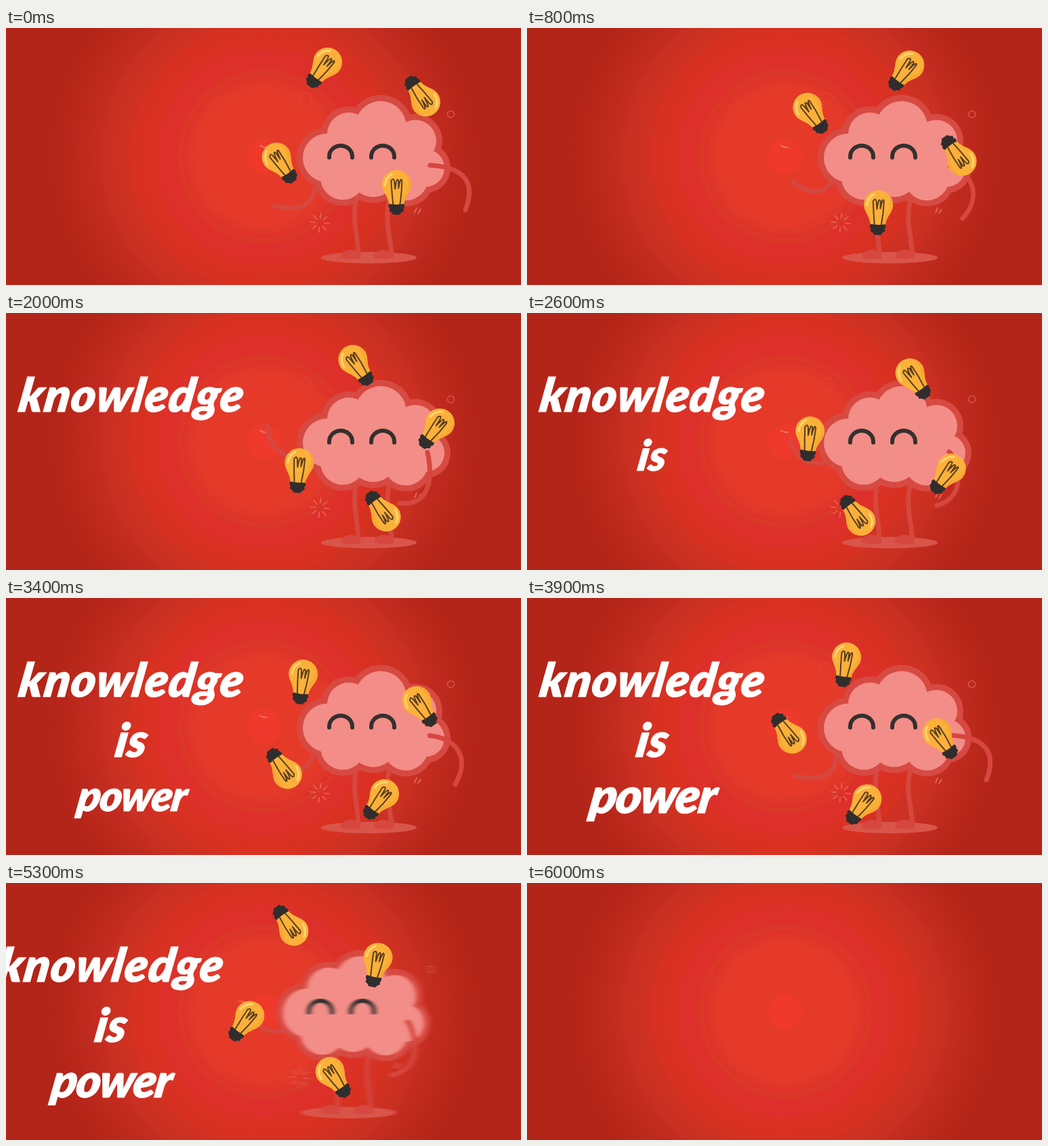
These frames come from a looping animation (760 by 380 pixels, 6.1 s). An HTML page:

```html
<!DOCTYPE html>
<html lang="en">
<head>
<meta charset="utf-8">
<title>Knowledge is power</title>
<style>
  html, body { margin: 0; width: 100%; height: 100%; overflow: hidden; background: #b32518; }
  svg { display: block; width: 100%; height: 100%; }
  text {
    font: italic 900 69px Lato, "Open Sans", sans-serif;
    fill: #fff; stroke: #fff; stroke-width: 1; stroke-linejoin: round;
    text-anchor: middle;
  }
</style>
</head>
<body>
<svg viewBox="0 0 760 380" xmlns="http://www.w3.org/2000/svg">
  <defs>
    <radialGradient id="glow" gradientUnits="userSpaceOnUse" cx="381" cy="190" r="400">
      <stop offset="0" stop-color="#ef392c"/>
      <stop offset=".058" stop-color="#ee392b"/>
      <stop offset=".068" stop-color="#e63a29"/>
      <stop offset=".25" stop-color="#e53929"/>
      <stop offset=".275" stop-color="#de3829"/>
      <stop offset=".288" stop-color="#e03529"/>
      <stop offset=".295" stop-color="#de312a"/>
      <stop offset=".303" stop-color="#db3828"/>
      <stop offset=".316" stop-color="#db3728"/>
      <stop offset=".325" stop-color="#de302a"/>
      <stop offset=".385" stop-color="#de302a"/>
      <stop offset=".415" stop-color="#d93122"/>
      <stop offset=".485" stop-color="#d73121"/>
      <stop offset=".51" stop-color="#cf3122"/>
      <stop offset=".59" stop-color="#c93022"/>
      <stop offset=".61" stop-color="#c42c20"/>
      <stop offset=".68" stop-color="#bd291d"/>
      <stop offset=".75" stop-color="#b62619"/>
      <stop offset=".8" stop-color="#b32518"/>
    </radialGradient>
    <filter id="smear" filterUnits="userSpaceOnUse" x="300" y="60" width="460" height="320" color-interpolation-filters="sRGB">
      <feGaussianBlur id="blur" stdDeviation="0 0"/>
    </filter>
    <g id="bulb">
      <path d="M0-33A21.5 21.5 0 0 1 21.5-11.5C21.5-1 12 5 11 18H-11C-12 5-21.5-1-21.5-11.5A21.5 21.5 0 0 1 0-33Z" fill="#fbb139"/>
      <path d="M13-28A21.5 21.5 0 0 1 21.5-11.5C21.5-1 12 5 11 18H6C7 4 16-1 17-12Q17.500-22 13-28Z" fill="#f7a834"/>
      <path d="M-17-10Q-16-22-7-27" fill="none" stroke="#ffd478" stroke-width="3" stroke-linecap="round"/>
      <path d="M-5 18Q-7 0-8-17Q-4-23-3-15L-2-5Q0-24 3-17L3-6Q6-24 8-17Q8 0 5 18" fill="none" stroke="#5a3d20" stroke-width="2" stroke-linejoin="round"/>
      <path d="M-11 17Q0 19 11 17L12 21 10 24 11 27 7 30 5 33H-5L-7 30-11 27-10 24-12 21Z" fill="#302d2d"/>
    </g>
  </defs>
  <rect width="760" height="380" fill="url(#glow)"/>
  <g id="scene">
    <g id="figure">
      <ellipse cx="535.5" cy="339.500" rx="70.500" ry="8.500" fill="#d9554a"/>
      <g fill="none" stroke="#e66254" stroke-width="1.500" stroke-linecap="round">
        <circle cx="442" cy="105" r="9" stroke="#de5044" stroke-dasharray="1.500 4.200"/>
        <circle cx="656.500" cy="127.500" r="5" stroke="#d95549"/>
        <path d="M375 174Q380 177 385 176.500" stroke="#ef7466" stroke-width="2"/>
        <path d="M606 266L603 273M612 268L608 274" stroke="#e27468"/>
        <path id="burst" stroke-width="1.800"/>
      </g>
      <g fill="none" stroke="#d5473f" stroke-width="7" stroke-linecap="round">
        <path id="armL"/>
        <path d="M516 256Q513 278 516 297T520 334M565 256Q561 276 564 297T569 333"/>
      </g>
      <path d="M494 340Q494 330 506 328Q516 327 523 334V341Q508 343 494 340ZM543 340Q543 330 555 328Q565 327 572 334V341Q557 343 543 340Z" fill="#d5473f"/>
      <g id="rim" fill="#d64a42"/>
      <g id="flesh" fill="#f38d87"/>
      <ellipse cx="545" cy="190" rx="68" ry="48" fill="#f38d87"/>
      <path d="M477 191.500V190A17 16 0 0 1 511 190V191.500M539 191.500V190A17 16 0 0 1 573 190V191.500" fill="none" stroke="#34302f" stroke-width="6" stroke-linecap="round"/>
      <path id="armR" fill="none" stroke="#d5473f" stroke-width="7" stroke-linecap="round"/>
    </g>
    <g id="bulbs"></g>
    <g id="words">
      <g><text y="19" letter-spacing="1.3">knowledge</text></g>
      <g><text y="23">is</text></g>
      <g><text y="17" letter-spacing="-1.5">power</text></g>
    </g>
  </g>
</svg>
<script>
const NS = 'http://www.w3.org/2000/svg';
const LOOP = 6100, STEP = 100;
const get = id => document.getElementById(id);

function add(parent, tag, attrs) {
  const el = document.createElementNS(NS, tag);
  for (const k in attrs) el.setAttribute(k, attrs[k]);
  parent.appendChild(el);
  return el;
}

// Cloud lobes: x, y, radius
const lobes = [
  [474, 192, 36], [506, 157, 32], [553, 146, 38], [604, 167, 31],
  [619, 207, 28], [590, 222, 33], [542, 215, 35], [497, 221, 33]
];
for (const [cx, cy, r] of lobes) {
  add(get('rim'), 'circle', { cx, cy, r: r + 9 });
  add(get('flesh'), 'circle', { cx, cy, r });
}

let rays = '';
for (let i = 0; i < 8; i++) {
  const a = i * Math.PI / 4 + 0.1, c = Math.cos(a), s = Math.sin(a);
  rays += `M${463 + 7 * c} ${288 + 7 * s}L${463 + 14 * c} ${288 + 14 * s}`;
}
get('burst').setAttribute('d', rays);

// Orbit centre, radius, start angle, tilt and tilt speed in degrees
const SPIN = 52.2;
const bulbs = [
  { x: 509.5, y: 183, r: 105.3, a: 170.5, tilt: -35, turn: 0 },
  { x: 508, y: 182, r: 91.6, a: 41.8, tilt: 0, turn: 2.2 },
  { x: 507, y: 180, r: 126.7, a: 251.9, tilt: 37, turn: 0 },
  { x: 509, y: 173.5, r: 127.1, a: 324.7, tilt: 144, turn: 0 }
];
for (const b of bulbs) b.el = add(get('bulbs'), 'use', { href: '#bulb' });

const words = [
  { y: 127, start: 1 }, { y: 212, start: 2.3 }, { y: 300, start: 3.1 }
];
words.forEach((w, i) => { w.el = get('words').children[i]; });

// Arm curves: folded and stretched control points
const armL = [[436, 215, 404, 213, 387, 195, 386, 166], [456, 236, 452, 268, 425, 270, 396, 263]];
const armR = [[622, 206, 625, 218, 638, 288, 580, 281], [626, 203, 665, 205, 697, 220, 678, 269]];

const clamp = v => Math.min(1, Math.max(0, v));

function backOut(p) {
  const q = 1 - p;
  return 1 + 1.70158 * q * q - 2.70158 * q * q * q;
}

function bend(id, [from, to], u, dip) {
  const p = from.map((v, i) => v + (to[i] - v) * u);
  p[7] += dip * 4 * u * (1 - u);
  get(id).setAttribute('d', `M${p[0]} ${p[1]}C${p.slice(2).join(' ')}`);
}

function draw(t) {
  const out = clamp((t - 4.5) / 1.5);
  const shift = out > 0 ? -760 * 2 ** (10 * (out - 1)) : 0;
  get('scene').setAttribute('transform', `translate(${shift} 0)`);

  // Motion blur grows with the speed of the slide
  const smear = Math.min(8, -shift * 0.1);
  get('blur').setAttribute('stdDeviation', `${smear} 0`);
  get('figure').setAttribute('filter', smear > 0.5 ? 'url(#smear)' : 'none');

  const u = (1 + Math.cos(2 * Math.PI * t / 3.9)) / 2;
  bend('armL', armL, u, 0);
  bend('armR', armR, u, 9);

  for (const b of bulbs) {
    const a = (b.a + SPIN * t) * Math.PI / 180;
    const x = b.x + b.r * Math.cos(a), y = b.y + b.r * Math.sin(a);
    b.el.setAttribute('transform', `translate(${x} ${y}) rotate(${b.tilt + b.turn * t})`);
  }

  for (const w of words) {
    const p = clamp((t - w.start) / 1);
    const size = Math.max(0, backOut(p));
    w.el.setAttribute('visibility', p > 0 ? 'visible' : 'hidden');
    w.el.setAttribute('transform', `translate(185.5 ${w.y}) scale(${size}) skewX(-9)`);
  }
}

const begin = performance.now();
function tick() {
  const ms = (performance.now() - begin) % LOOP;
  draw(Math.floor(ms / STEP) * STEP / 1000);
  requestAnimationFrame(tick);
}
draw(0);
requestAnimationFrame(tick);
</script>
</body>
</html>
```
